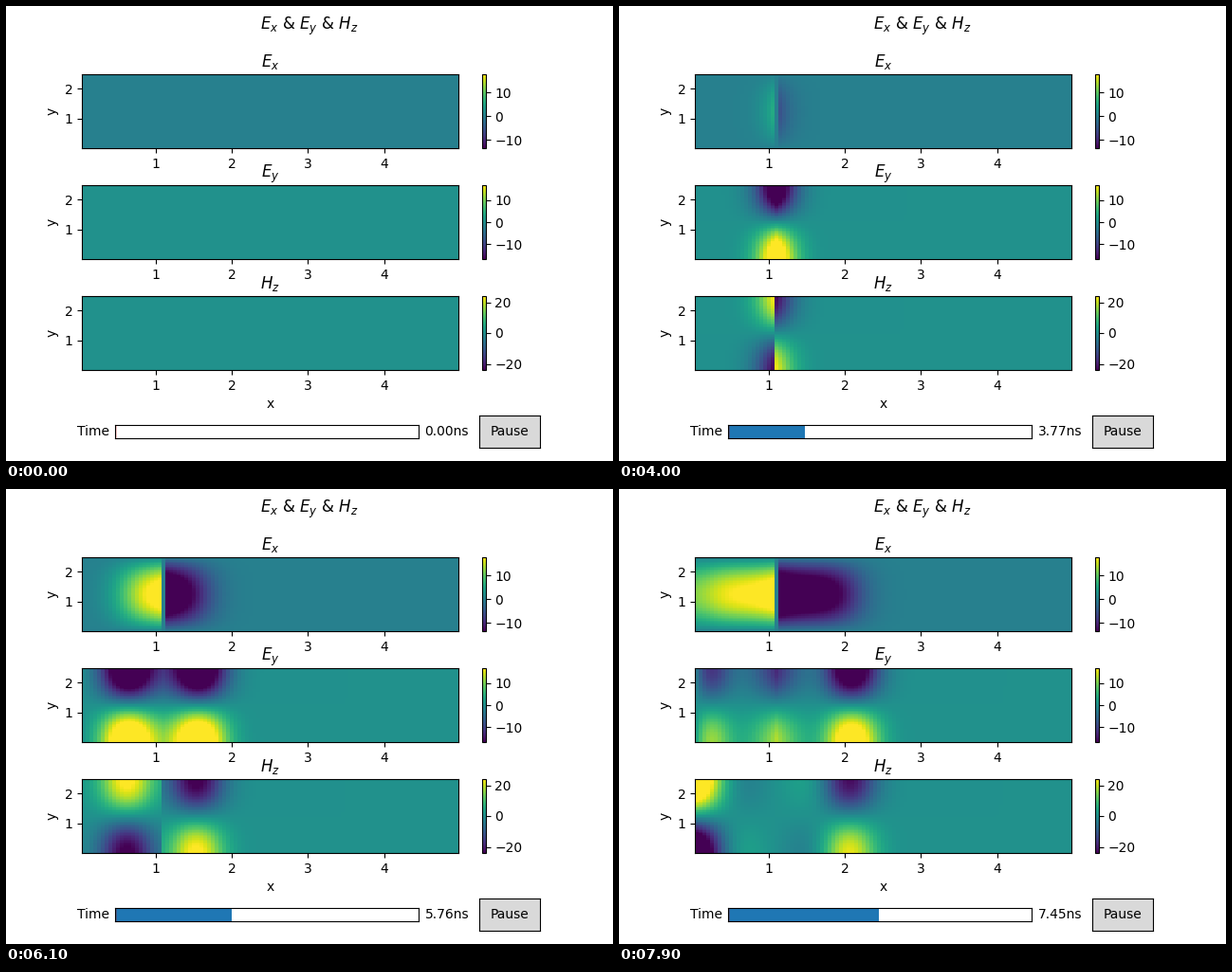
A matplotlib script that plays this animation: 640 px wide and 480 px high, repeating every 8 s.

```python
import numpy as np
import matplotlib.pyplot as plt
from matplotlib.animation import FuncAnimation

# Parallel-plate waveguide with conducting walls, driven by a current sheet
NX, NY, H = 100, 50, 0.05          # cells and cell size (m)
C = 0.299792458                    # speed of light (m/ns)
S = 0.8 / np.sqrt(2)               # Courant number
DT = S * H / C                     # time step (ns)
T_MAX = 15.0
FRAMES = 80
SHEET = 22                         # grid column of the current sheet
AMP, T0, TAU = 57.0, 4.2, 1.2      # Gaussian pulse


def simulate(steps):
    """Yee scheme; returns Ex, Ey, Hz for every step on the inner nodes."""
    ex = np.zeros((NX, NY + 1))
    ey = np.zeros((NX + 1, NY))
    hz = np.zeros((NX, NY))
    profile = np.cos(np.pi * (np.arange(NY) + 0.5) / NY)
    shots = []
    for n in range(steps):
        shots.append((
            (ex[1:, 1:-1] + ex[:-1, 1:-1]).T / 2,
            (ey[1:-1, 1:] + ey[1:-1, :-1]).T / 2,
            hz[1:, 1:].T.copy(),
        ))
        hz += S * (np.diff(ex, axis=1) - np.diff(ey, axis=0))
        ex[:, 1:-1] += S * np.diff(hz, axis=1)
        ey[1:-1] -= S * np.diff(hz, axis=0)
        pulse = np.exp(-(((n + 0.5) * DT - T0) / TAU) ** 2)
        ey[SHEET] += S * AMP * pulse * profile
    return shots


shots = simulate(FRAMES)

fig, axes = plt.subplots(3, 1, figsize=(6.4, 4.8), dpi=100)
fig.subplots_adjust(left=0.125, right=0.9, top=0.85, bottom=0.2, hspace=0.5)
fig.suptitle("$E_x$ & $E_y$ & $H_z$")

x = np.arange(1, NX) * H
y = np.arange(1, NY) * H
panels = [
    ("$E_x$", -13.5, 17.8, 10),
    ("$E_y$", -16.8, 16.8, 10),
    ("$H_z$", -24.0, 24.0, 20),
]
meshes = []
for ax, (title, lo, hi, tick), field in zip(axes, panels, shots[0]):
    mesh = ax.pcolormesh(x, y, field, vmin=lo, vmax=hi,
                         cmap="viridis", shading="nearest")
    ax.set_title(title)
    ax.set_ylabel("y")
    ax.set_xticks([1, 2, 3, 4])
    ax.set_yticks([1, 2])
    fig.colorbar(mesh, ax=ax, ticks=[-tick, 0, tick])
    meshes.append(mesh)
axes[-1].set_xlabel("x")


def box(rect, color):
    ax = fig.add_axes(rect, facecolor=color)
    ax.set(xticks=[], yticks=[], xlim=(0, T_MAX), ylim=(0, 1))
    return ax


bar_ax = box([0.18, 0.05, 0.5, 0.03], "white")
bar = plt.Rectangle((0, 0), 0, 1, facecolor="tab:blue", edgecolor="none")
bar_ax.add_patch(bar)
bar_ax.axvline(0, color="red", lw=1)
bar_ax.text(-0.02, 0.5, "Time", transform=bar_ax.transAxes,
            ha="right", va="center")
clock = bar_ax.text(1.02, 0.5, "", transform=bar_ax.transAxes,
                    ha="left", va="center")

button_ax = box([0.78, 0.03, 0.1, 0.07], "0.85")
button_ax.text(0.5, 0.5, "Pause", transform=button_ax.transAxes,
               ha="center", va="center")


def update(n):
    for mesh, field in zip(meshes, shots[n]):
        mesh.set_array(field)
    t = n * DT
    bar.set_width(t)
    clock.set_text(f"{t:.2f}ns")
    return [*meshes, bar, clock]


anim = FuncAnimation(fig, update, frames=FRAMES, interval=100,
                     repeat=True, repeat_delay=0)
plt.show()
```
